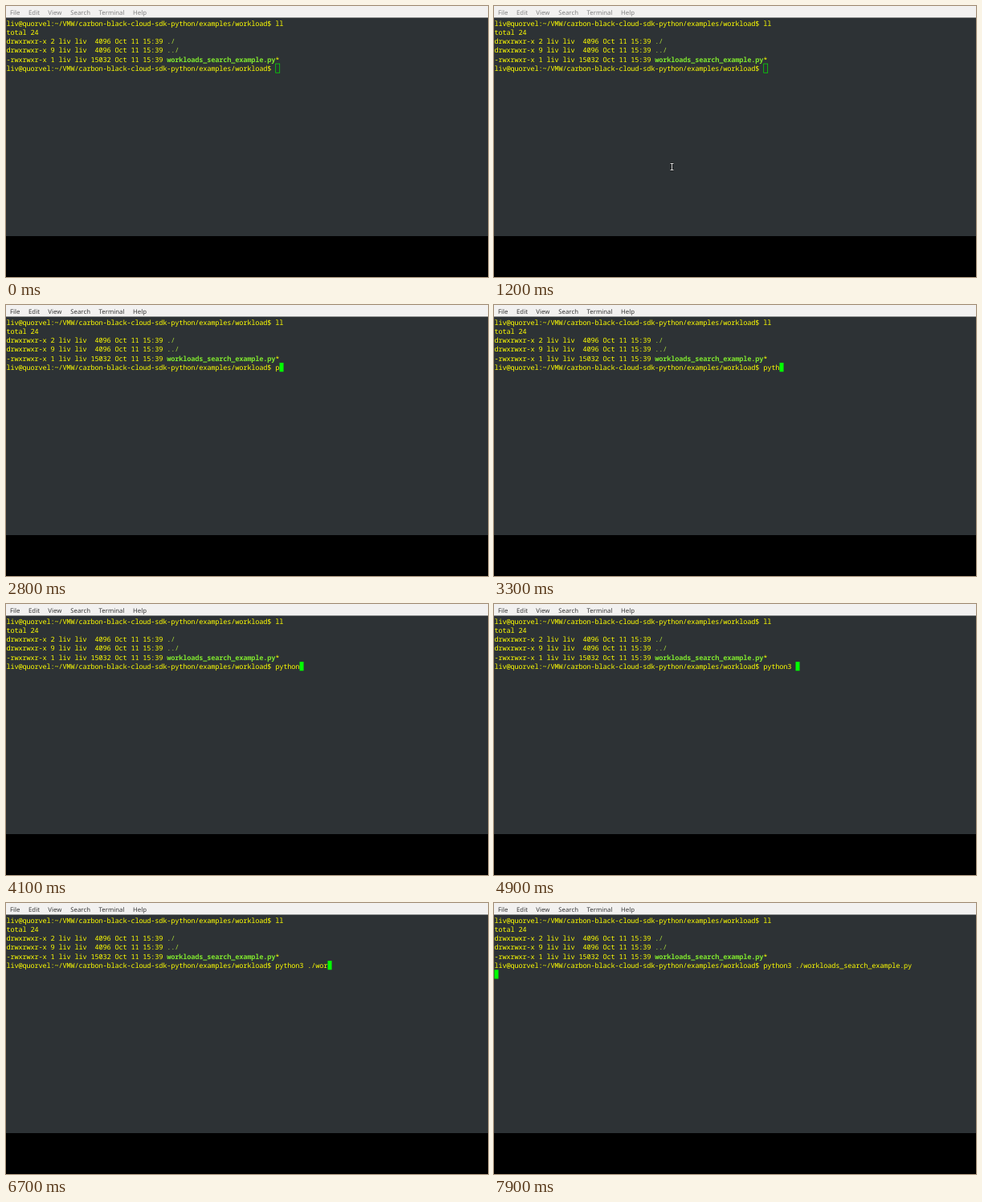
Animation, 600 px wide and 338 px high, one loop 8000 ms. Source, as an HTML page:

```html
<!DOCTYPE html>
<html lang="en">
<head>
<meta charset="utf-8">
<title>Terminal session</title>
<style>
  html, body { margin: 0; width: 100%; height: 100%; overflow: hidden; background: #000; }
  svg { display: block; width: 600px; height: 338px; text-rendering: geometricPrecision; }
  #menu { font: 7.8px "Noto Sans", sans-serif; }
  #term {
    font: 500 8.6px "Noto Sans Mono", monospace;
    letter-spacing: -0.16px;
    fill: #ff0;
  }
  #term text { white-space: pre; }
  .dir { fill: #a8d83a; }
  .exe { fill: #7fe62e; font-weight: 700; }
  #mouse path { fill: none; }
</style>
</head>
<body>
<svg viewBox="0 0 600 338">
  <rect width="600" height="338" fill="#000"/>
  <rect width="600" height="287" fill="#2d3235"/>
  <rect width="600" height="14.5" fill="#f2f1f0"/>
  <g id="menu">
    <text x="5" y="10.6">File</text>
    <text x="28" y="10.6">Edit</text>
    <text x="52.3" y="10.6">View</text>
    <text x="80.3" y="10.6">Search</text>
    <text x="115.5" y="10.6">Terminal</text>
    <text x="158" y="10.6">Help</text>
  </g>
  <rect id="cursor" width="5" height="11.2"/>
  <g id="term"></g>
  <g id="mouse">
    <path d="M-2-4H2M-2 4H2M0-4V4" stroke="#111" stroke-width="2"/>
    <path d="M-2-4H2M-2 4H2M0-4V4" stroke="#eee" stroke-width=".9"/>
  </g>
</svg>
<script>
const LOOP = 8000, TICK = 100;
const CELL = 5, ROW = 11.25, LEFT = 0.5, TOP = 16;
const PROMPT = "liv@quorvel:~/VMW/carbon-black-cloud-sdk-python/examples/workload$ ";
const COMMAND = "python3 ./workloads_search_example.py ";
const ENTER = 7800, FOCUS = 1900;

// [time, characters typed so far]; the last key completes the file name
const KEYS = [
  [2700, 1], [2900, 2], [3100, 3], [3200, 4], [3400, 5], [3600, 6],
  [4600, 7], [4800, 8], [5500, 9], [5600, 10],
  [6400, 11], [6500, 12], [6700, 13], [6800, COMMAND.length]
];

const $ = id => document.getElementById(id);
const term = $("term"), menu = $("menu"), cursor = $("cursor"), mouse = $("mouse");

function addLine(row, html) {
  const line = document.createElementNS("http://www.w3.org/2000/svg", "text");
  line.setAttribute("x", LEFT);
  line.setAttribute("y", TOP + 8.5 + row * ROW);
  line.innerHTML = html;
  term.append(line);
  return line;
}

const span = (cls, text) => `<tspan class="${cls}">${text}</tspan>`;
[
  PROMPT + "ll",
  "total 24",
  "drwxrwxr-x 2 liv liv  4096 Oct 11 15:39 " + span("dir", "./"),
  "drwxrwxr-x 9 liv liv  4096 Oct 11 15:39 " + span("dir", "../"),
  "-rwxrwxr-x 1 liv liv 15032 Oct 11 15:39 " + span("exe", "workloads_search_example.py") + "*"
].forEach((html, row) => addLine(row, html));
const input = addLine(5, PROMPT);

const clamp = v => Math.max(0, Math.min(1, v));

function drawCursor(t, typed, lastKey) {
  const focused = t >= FOCUS, entered = t >= ENTER;
  const col = entered ? 0 : PROMPT.length + typed;
  const on = !focused || Math.floor((t - lastKey) / 600) % 2 === 0;
  cursor.setAttribute("x", LEFT + col * CELL + (focused ? 0 : 0.2));
  cursor.setAttribute("y", TOP + (entered ? 6 : 5) * ROW - 0.2);
  cursor.setAttribute("fill", focused ? "#0f0" : "none");
  cursor.setAttribute("stroke", focused ? "none" : "#0e0");
  cursor.setAttribute("stroke-width", 0.7);
  cursor.setAttribute("visibility", on ? "visible" : "hidden");
}

function drawMouse(t) {
  const p = clamp((t - 600) / 600), e = 1 - (1 - p) ** 2;
  const shown = t >= 600 && t < KEYS[0][0];
  mouse.setAttribute("transform", `translate(${133 + 88.5 * e} ${263 - 62.5 * e})`);
  mouse.setAttribute("visibility", shown ? "visible" : "hidden");
}

function draw(time) {
  const t = Math.floor(time % LOOP / TICK) * TICK;
  let typed = 0, lastKey = FOCUS;
  for (const [at, count] of KEYS) if (t >= at) [lastKey, typed] = [at, count];
  if (t >= ENTER) lastKey = ENTER;

  const shade = Math.round(128 - 74 * clamp((t - 1700) / 300));
  menu.setAttribute("fill", `rgb(${shade},${shade},${shade})`);
  input.textContent = PROMPT + COMMAND.slice(0, typed);
  drawCursor(t, typed, lastKey);
  drawMouse(t);
}

function loop() {
  draw(performance.now());
  requestAnimationFrame(loop);
}
loop();
</script>
</body>
</html>
```
